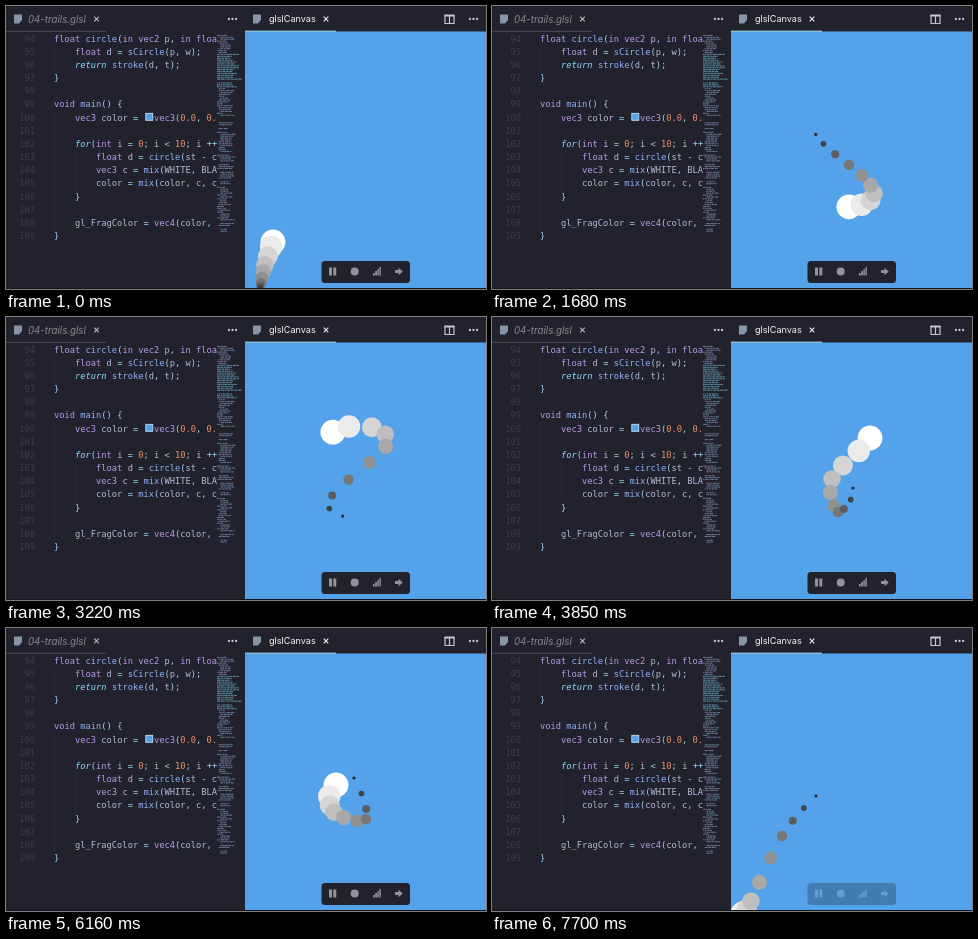
These frames come from a looping animation (480 by 283 pixels, 7.77 s). An HTML page:

```html
<!DOCTYPE html>
<html lang="en">
<head>
<meta charset="utf-8">
<title>GLSL trails</title>
<style>
  html, body { margin: 0; width: 100%; height: 100%; overflow: hidden; background: #22222c; }
  svg { display: block; width: 100vw; height: 100vh; }
  .code { font: 8.74px "DejaVu Sans Mono", monospace; }
  .tab { font-family: Inter, sans-serif; }
</style>
</head>
<body>
<svg viewBox="0 0 480 283">
  <defs>
    <clipPath id="codeClip"><rect y="26" width="211" height="256"/></clipPath>
    <clipPath id="canvasClip"><rect x="239" y="26" width="241" height="256"/></clipPath>
    <path id="fileIcon" d="M0 0H8V5.5L5 9H0Z" fill="#8796a5"/>
    <path id="close" d="M-2.3-2.3L2.3 2.3M2.3-2.3L-2.3 2.3" stroke-width="1.2"/>
    <g id="more"><circle cx="-3.6" r="1.15"/><circle r="1.15"/><circle cx="3.6" r="1.15"/></g>
  </defs>
  <rect width="480" height="283" fill="#22222c"/>
  <path d="M48.5 40V66M48.5 105V223M69.5 145V183" stroke="#30303d" stroke-width=".7"/>
  <g id="code" class="code" clip-path="url(#codeClip)"></g>
  <g id="minimap" opacity=".8"></g>

  <rect y="24.8" width="100" height="1" fill="#4a4a58"/>
  <use href="#fileIcon" x="8" y="8.5"/>
  <text class="tab" x="22" y="16.6" font-size="9.7" font-style="italic" fill="#898a98">04-trails.glsl</text>
  <use href="#close" x="90.5" y="13" stroke="#b6b7c2"/>
  <use href="#more" x="226.5" y="13" fill="#c5c6d0"/>

  <use href="#fileIcon" x="247" y="8.5"/>
  <text class="tab" x="263" y="16.4" font-size="9.1" fill="#f4f4f8">glslCanvas</text>
  <use href="#close" x="320" y="13" stroke="#e6e6ee"/>
  <g fill="none" stroke="#c5c6d0" stroke-width="1.2">
    <path d="M439 9.5H448V17.5H439ZM443.5 9V17.5"/><path d="M438.5 9.5H448.5" stroke-width="2"/>
  </g>
  <use href="#more" x="467.5" y="13" fill="#c5c6d0"/>

  <rect x="239" y="25.5" width="241" height="256.5" fill="#53a2ea"/>
  <rect x="239" y="24.6" width="91" height="1.3" fill="#8fc9e3"/>
  <g id="trail" clip-path="url(#canvasClip)"></g>
  <g id="toolbar">
    <rect x="315.5" y="255" width="88.5" height="22" rx="3.5" fill="#22222c"/>
    <g fill="#92939b">
      <path d="M323 261.5h3v8h-3zM327.3 261.5h3v8h-3z"/>
      <circle cx="348.7" cy="265.5" r="4"/>
      <path d="M367 267h1.7v2.5H367zM369.2 265h1.7v4.5h-1.7zM371.4 263h1.4v6.5h-1.4zM373.4 261h1.4v8.5h-1.4z"/>
      <path d="M389 264h3.5v-2.3l4.2 3.8-4.2 3.8V267H389z"/>
    </g>
  </g>
  <rect y="282" width="480" height="1" fill="#15131d"/>
</svg>
<script>
const LOOP = 7770, STEP = 70, COUNT = 10, LAG = 50, PI = Math.PI;
const $ = id => document.getElementById(id);

function add(parent, tag, attrs, text) {
  const el = document.createElementNS('http://www.w3.org/2000/svg', tag);
  for (const k in attrs) el.setAttribute(k, attrs[k]);
  if (text) el.textContent = text.replace(/ /g, '\u00a0');
  parent.appendChild(el);
  return el;
}

// Editor; the two extra spaces on the color line leave room for its swatch
const source = `float circle(in vec2 p, in float w, float t) {
    float d = sCircle(p, w);
    return stroke(d, t);
}

void main() {
    vec3 color =   vec3(0.0, 0.0, 0.0);

    for(int i = 0; i < 10; i ++) {
        float d = circle(st - c, w);
        vec3 c = mix(WHITE, BLACK, i);
        color = mix(color, c, c);
    }

    gl_FragColor = vec4(color, 1.0);
}`;
// Groups: control, type, number, call, punctuation, plain
const tokens = /(\b(?:return|for)\b)|(\b(?:void|float|int|in|vec\d)\b)|(\b\d+\.?\d*)|(\w+(?=\())|([^\w\s]+)|(\w+|\s+)/g;
const tokenColors = ['#89ddff', '#b99be8', '#f0906f', '#8fb2fa', '#9fd3ee', '#b5bbd6'];

function drawCode() {
  source.split('\n').forEach((line, row) => {
    const y = 35.6 + row * 13.17;
    add($('code'), 'text', { x: 29, y, 'text-anchor': 'end', fill: '#3d3d4c' }, String(94 + row));
    const text = add($('code'), 'text', { x: 48, y });
    for (const [token, ...groups] of line.matchAll(tokens)) {
      const kind = groups.findIndex(Boolean);
      add(text, 'tspan', { fill: tokenColors[kind], 'font-style': kind ? 'normal' : 'italic' }, token);
    }
  });
  add($('code'), 'rect', { x: 139.8, y: 107.3, width: 7, height: 7, fill: '#53a2ea', stroke: '#d5e6f5', 'stroke-width': .8 });
}

function drawMinimap() {
  let seed = 7;
  const random = () => (seed = seed * 16807 % 2147483647) / 2147483647;
  const colors = ['#8479a8', '#698dae', '#85869b', '#668fa4'];
  for (let y = 27; y < 225; y += 1.9) {
    if (random() < .1) continue;
    const dense = y > 46 && y < 82;
    let x = 211 + (dense ? 0 : Math.floor(random() * 3) * 1.7);
    const end = x + (dense ? 13 : 5) + random() * 9;
    while (x < end) {
      const width = 1 + random() * 3;
      add($('minimap'), 'rect', { x, y, width, height: 1.1, fill: dense ? '#64a2b7' : colors[Math.floor(random() * 4)] });
      x += width + .6;
    }
  }
}

// Pointer path: short strokes through four evenly timed points, joined by figure-eight sweeps
const path = [];

function stroke(end, points) {
  points.split(' ').forEach((point, i) => {
    const [x, y] = point.split(',').map(Number);
    path.push({ t: end - (9 - 3 * i) * LAG, x, y });
  });
}

function sweep(until, from, to) {
  const start = path[path.length - 1].t, n = Math.round((until - start) / 75);
  for (let j = 1; j < n; j++) {
    const k = j / n, a = from + (to - from) * k;
    path.push({ t: start + (until - start) * k, x: 352 + 30 * Math.sin(2 * a), y: 155 - 46 * Math.sin(a) });
  }
}

stroke(0, '254,283 255,277 259,259 267,236');
path.push({ t: 200, x: 264, y: 250 });
stroke(840, '261,267 303,228 377,188 403,159');
sweep(2140, .7, 2 * PI + .5);
stroke(2590, '350,133 319,132 359,168 400,173');
sweep(3400, PI + .5, 3 * PI + .3);
stroke(3850, '361,171 346,195 340,162 378,121');
sweep(4520, .7, 2 * PI + .1);
stroke(4970, '347,151 328,115 316,135 373,152');
sweep(5710, PI + .2, 3 * PI);
stroke(6160, '348,150 360,191 328,184 330,157');
sweep(7250, 2 * PI - .1, 5 * PI + .6);
stroke(7700, '324,168 290,208 259,273 251,286');

function slope(i, axis) {
  const a = path[Math.max(i - 1, 0)], b = path[Math.min(i + 1, path.length - 1)];
  return (b[axis] - a[axis]) / (b.t - a.t);
}

function pointerAt(t) {
  const i = Math.max(0, path.findIndex(p => p.t >= t) - 1);
  const a = path[i], b = path[i + 1], h = b.t - a.t, u = (t - a.t) / h, v = 1 - u;
  return ['x', 'y'].map(axis => v * v * (1 + 2 * u) * a[axis] + u * u * (3 - 2 * u) * b[axis]
    + h * u * v * (v * slope(i, axis) - u * slope(i + 1, axis)));
}

drawCode();
drawMinimap();
const dots = Array.from({ length: COUNT }, (_, i) => {
  const g = Math.round(255 - 20 * i - .45 * i * i);
  return add($('trail'), 'circle', { r: 12.4 - 1.2 * i, fill: `rgb(${g},${g},${g})` });
});

function render(t) {
  dots.forEach((dot, i) => {
    const [x, y] = pointerAt(t - i * LAG);
    dot.setAttribute('cx', x);
    dot.setAttribute('cy', y);
  });
  $('toolbar').setAttribute('opacity', Math.max(0, Math.min(1, (7760 - t) / 200)));
}

const began = performance.now();
function tick() {
  const t = (performance.now() - began) % LOOP;
  render(Math.floor(t / STEP) * STEP);
  requestAnimationFrame(tick);
}
tick();
</script>
</body>
</html>
```
